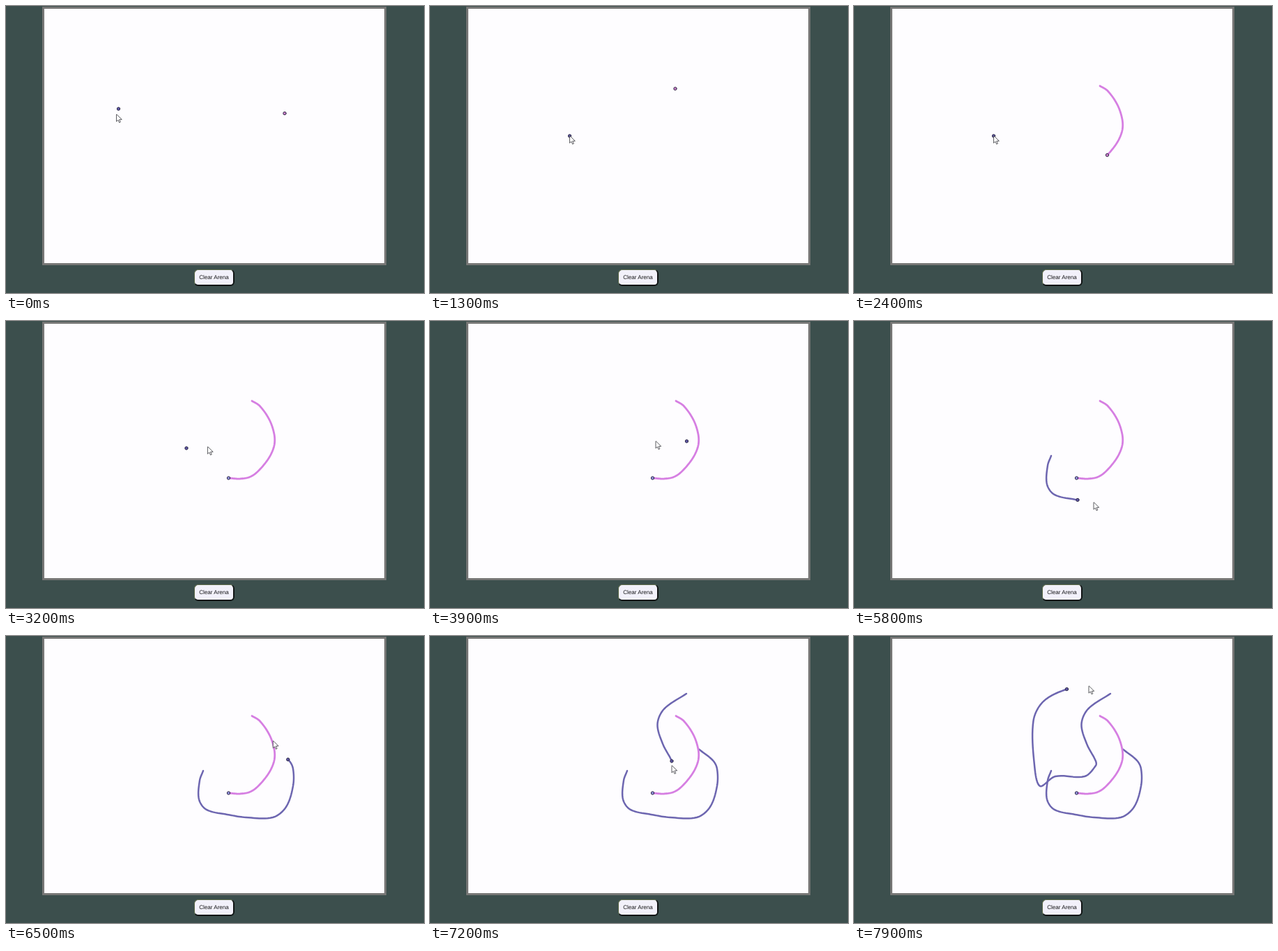
Recreate the animation shown at these times as an HTML page with a canvas. Size 600 by 413 pixels, loop 8000 ms.

```html
<!DOCTYPE html>
<html lang="en">
<head>
<meta charset="utf-8">
<title>Arena</title>
<style>
html, body { margin: 0; width: 100%; height: 100%; overflow: hidden; background: #3c4f4d; }
canvas { position: absolute; left: 0; top: 0; }
.clear {
  position: absolute; left: 270px; top: 379px; width: 58px; height: 24px;
  box-sizing: border-box; border: 1px solid #5d6b48; border-right: 2px solid #101414;
  border-bottom: 2px solid #101414; border-radius: 6px; background: #f2f1fa;
  font: 8.1px/22px "Liberation Sans", Arial, sans-serif; color: #161618;
  text-rendering: geometricPrecision; text-align: center; white-space: nowrap;
}
</style>
</head>
<body>
<canvas id="arena" width="600" height="413"></canvas>
<div class="clear">Clear Arena</div>
<script>
const ctx = document.getElementById('arena').getContext('2d');
const LOOP = 8000, STEP = 100, LEAD = 130, SAMPLES = 10;

const dist = (a, b) => Math.hypot(b[0] - a[0], b[1] - a[1]);
const mix = (a, b, k) => a + (b - a) * k;

// Smooth curve through [x, y, time?]; between timed points the speed is constant.
function leg(ink, ...pts) {
  const tangent = i => {
    const p = pts[i - 1] || pts[i], q = pts[i + 1] || pts[i];
    const span = dist(p, pts[i]) + dist(pts[i], q);
    return [(q[0] - p[0]) / span, (q[1] - p[1]) / span];
  };
  const curve = [{ x: pts[0][0], y: pts[0][1], t: pts[0][2], s: 0 }];
  let anchor = 0;
  for (let i = 1; i < pts.length; i++) {
    const a = pts[i - 1], b = pts[i], d = dist(a, b);
    const m = tangent(i - 1), n = tangent(i);
    for (let j = 1; j <= SAMPLES; j++) {
      const u = j / SAMPLES, v = 1 - u;
      const [x, y] = [0, 1].map(c =>
        v * v * (1 + 2 * u) * a[c] + u * u * (3 - 2 * u) * b[c] + u * v * d * (v * m[c] - u * n[c]));
      const last = curve[curve.length - 1];
      curve.push({ x, y, s: last.s + Math.hypot(x - last.x, y - last.y) });
    }
    if (b[2] === undefined) continue;
    const from = curve[anchor], to = curve[curve.length - 1];
    for (const p of curve.slice(anchor + 1)) {
      p.t = mix(from.t, b[2], (p.s - from.s) / (to.s - from.s));
    }
    anchor = curve.length - 1;
  }
  return { ink, curve };
}

const pink = [
  leg(false, [400, 154.5, 0], [440, 153], [458, 134], [438, 118], [400, 116], [352, 119, 1200]),
  leg(true, [353, 115, 1800], [364, 122], [378, 142], [385, 163], [385, 179], [378, 196],
    [363.5, 214.5, 2400], [351, 224], [336, 227], [319.5, 226, 2620])
];
const blue = [
  leg(false, [161.5, 148, 0], [158.5, 156, LEAD], [152, 172], [200.5, 187, 900]),
  leg(false, [200.5, 187, 2950], [290, 181], [376, 176, 3700], [368.5, 173, 3900],
    [324, 173, 4030], [240, 165], [320, 121], [462, 150, 4550], [360, 212], [214, 190, 5200],
    [298, 153, 5500], [283, 194, 5600]),
  leg(true, [283, 194, 5600], [278, 208], [277, 235], [288, 250], [321, 257.5, 5800],
    [344, 261, 5800 + LEAD], [383, 261], [402, 246], [412, 216], [412, 191], [406, 179],
    [386, 163, 6600]),
  leg(false, [386, 163, 6600], [368, 83, 6800]),
  leg(true, [368, 83, 6800], [336, 105], [326.5, 127], [334, 155], [347, 180, 7200],
    [347, 186.5, 7200 + LEAD], [331, 202], [289, 202], [267, 216], [259, 186], [257.5, 122],
    [272, 94], [305.5, 76.5, 7900], [337, 72, 7900 + LEAD])
];

function at(legs, t) {
  const { curve } = legs.filter(l => l.curve[0].t <= t).pop();
  const i = curve.findIndex(p => p.t > t);
  if (i < 0) return curve[curve.length - 1];
  const a = curve[i - 1], b = curve[i], k = (t - a.t) / (b.t - a.t);
  return { x: mix(a.x, b.x, k), y: mix(a.y, b.y, k) };
}

function trails(legs, t, color, width) {
  ctx.strokeStyle = color;
  ctx.lineWidth = width;
  for (const { ink, curve } of legs) {
    const done = curve.filter(p => p.t <= t);
    if (!ink || !done.length) continue;
    if (done.length < curve.length) done.push(at(legs, t));
    ctx.beginPath();
    for (const p of done) ctx.lineTo(p.x, p.y);
    ctx.stroke();
  }
}

function dot({ x, y }, fill) {
  ctx.beginPath();
  ctx.arc(x, y, 2.2, 0, Math.PI * 2);
  ctx.fillStyle = fill;
  ctx.fill();
  ctx.strokeStyle = '#241f3c';
  ctx.lineWidth = 0.9;
  ctx.stroke();
}

function arrow({ x, y }) {
  const shape = [[0, 0], [0, 10.2], [2.4, 8], [4.1, 11.8], [5.8, 11], [4.2, 7.4], [7.4, 7.3]];
  ctx.beginPath();
  for (const [dx, dy] of shape) ctx.lineTo(x + dx, y + dy);
  ctx.closePath();
  ctx.fillStyle = '#fff';
  ctx.fill();
  ctx.strokeStyle = '#4a4a50';
  ctx.lineWidth = 0.9;
  ctx.stroke();
}

function draw(t) {
  ctx.fillStyle = '#3c4f4d';
  ctx.fillRect(0, 0, 600, 413);
  ctx.fillStyle = '#777776';
  ctx.fillRect(52, 1, 494, 372);
  ctx.fillStyle = '#fefdff';
  ctx.fillRect(55, 4, 488, 366);

  trails(blue, t, '#6d66b0', 2.5);
  trails(pink, t, '#d67fe2', 2.8);
  dot(at(pink, t), t < 2620 ? '#c980c8' : '#9292dc');
  dot(at(blue, t), '#605aa8');
  arrow(at(blue, t + LEAD));   // the dot chases the pointer
}

ctx.lineCap = ctx.lineJoin = 'round';
const start = performance.now();
function tick() {
  const t = (performance.now() - start) % LOOP;
  draw(Math.floor(t / STEP) * STEP);
  requestAnimationFrame(tick);
}
tick();
</script>
</body>
</html>
```
